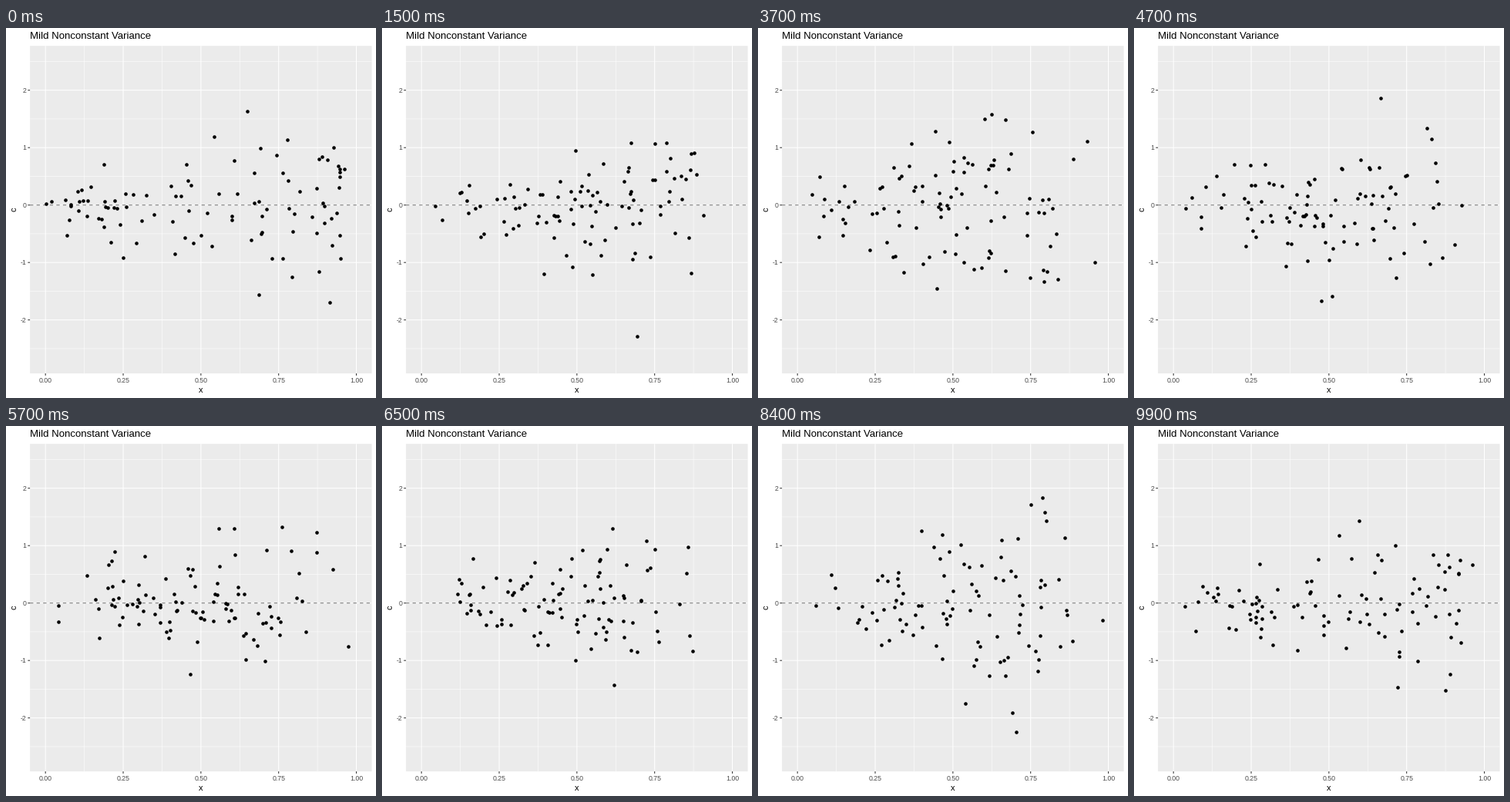
A matplotlib script that plays this animation: 480 by 480 pixels, repeating every 10000 ms.

```python
import numpy as np
import matplotlib.pyplot as plt
from matplotlib.animation import FuncAnimation
from matplotlib.patches import Rectangle

SIZE, DPI = 480, 72
LEFT, RIGHT, TOP, BOTTOM = 31.1, 474.5, 23.2, 448.1
X0, X_UNIT = 51.2, 403.3
Y0, Y_UNIT = 229.7, 74.5
LINE = 1.07
COUNT = 100

# Lowest and highest value of each sample.
RANGES = [(-1.7, 1.64), (-2.51, 1.6), (-2.0, 1.815), (-2.33, 1.7),
          (-2.04, 2.42), (-2.02, 2.51), (-1.9, 1.9), (-2.39, 2.06),
          (-2.2, 2.12), (-2.67, 2.23)]


def px(x):
    return X0 + X_UNIT * x


def py(y):
    return Y0 - Y_UNIT * y


def sample(rng, low, high):
    """Noise whose variance grows with x, fitted to the given range."""
    x = rng.uniform(0, 1, COUNT)
    y = rng.normal(0, np.sqrt(x))
    y *= np.where(y > 0, high / y.max(), low / y.min())
    return np.column_stack([px(x), py(y)])


rng = np.random.default_rng(12)
states = [sample(rng, low, high) for low, high in RANGES]

fig = plt.figure(figsize=(SIZE / DPI, SIZE / DPI), dpi=DPI, facecolor="white")
ax = fig.add_axes([0, 0, 1, 1])
ax.set_xlim(0, SIZE)
ax.set_ylim(SIZE, 0)
ax.set_autoscale_on(False)
ax.axis("off")


def line(xs, ys, color="white", width=LINE, z=1, **style):
    ax.plot(xs, ys, color=color, lw=width, zorder=z, snap=False,
            solid_capstyle="butt", dash_capstyle="butt", **style)


def label(x, y, text, size, color="black", **style):
    style = {"ha": "center", "va": "baseline", **style}
    ax.text(x, y, text, fontsize=size, color=color,
            family="Liberation Sans", **style)


def vline(x, width):
    line([x, x], [TOP, BOTTOM], width=width)


def hline(y, width):
    line([LEFT, RIGHT], [y, y], width=width)


ax.add_patch(Rectangle((LEFT, TOP), RIGHT - LEFT, BOTTOM - TOP,
                       facecolor="#EBEBEB", lw=0, zorder=0, snap=False))

for x in np.arange(0.125, 1, 0.25):
    vline(px(x), LINE / 2)
for y in np.arange(-2.5, 3):
    hline(py(y), LINE / 2)
for x in np.arange(0, 1.1, 0.25):
    vline(px(x), LINE)
    line([px(x)] * 2, [BOTTOM, BOTTOM + 2.74], "#333333")
    label(px(x), 460, f"{x:.2f}", 8.8, "#4D4D4D")
for y in range(-2, 3):
    hline(py(y), LINE)
    line([LEFT - 2.74, LEFT], [py(y)] * 2, "#333333")
    label(26.2, py(y) + 3.2, str(y), 8.8, "#4D4D4D", ha="right")

line([LEFT, RIGHT], [Y0, Y0], "black", z=2, alpha=0.5, dashes=(4, 4))
label(LEFT, 14, "Mild Nonconstant Variance", 13.2, ha="left")
label((LEFT + RIGHT) / 2, 473, "x", 11)
label(10, (TOP + BOTTOM) / 2, "c", 11, rotation=90, va="center")

dots = ax.scatter(*states[0].T, s=4.6 ** 2, c="black", linewidths=0, zorder=3)


def draw(frame):
    """Move linearly; every sample but the opening one rests a frame."""
    i, step = divmod(frame, 10)
    t = step / 10 if i == 0 else max(step - 1, 0) / 9
    here, there = states[i], states[(i + 1) % len(states)]
    dots.set_offsets(here + (there - here) * t)
    return [dots]


anim = FuncAnimation(fig, draw, frames=100, interval=100, repeat=True)
plt.show()
```
